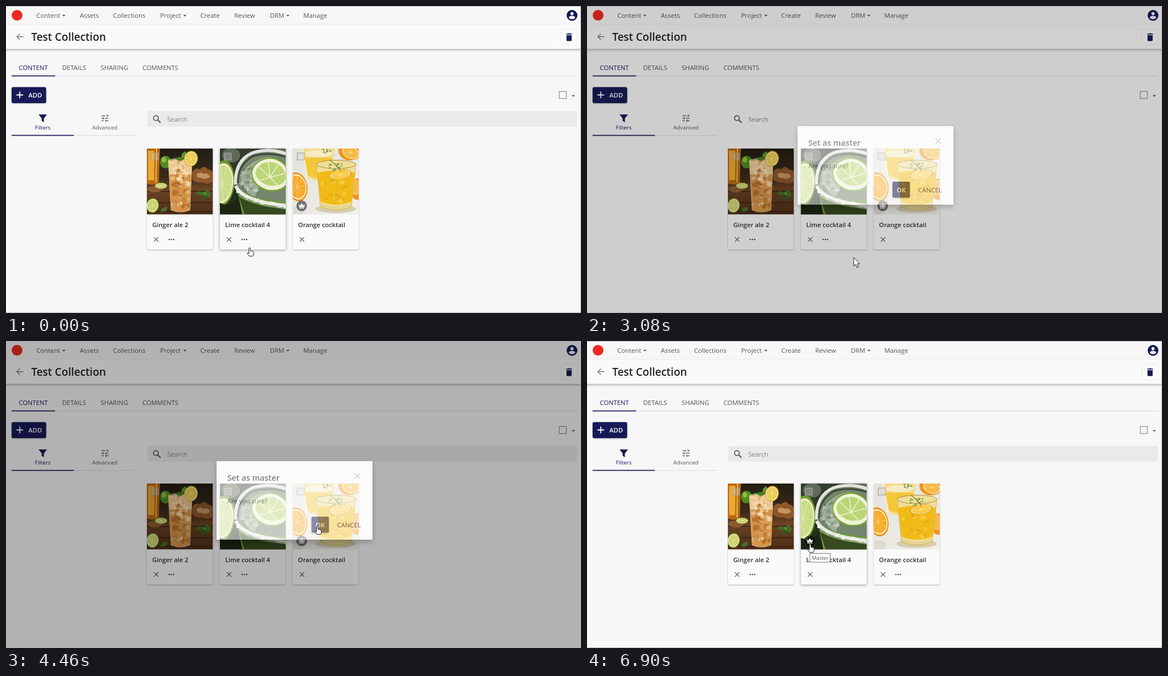
These frames come from a looping animation (1024 by 547 pixels, 8 s). An HTML page:

```html
<!DOCTYPE html>
<html lang="en">
<head>
<meta charset="utf-8">
<title>Set as master</title>
<style>
html, body { margin: 0; width: 100%; height: 100%; overflow: hidden; background: #f7f7f7; }
svg { display: block; width: 100vw; height: 100vh; }
text { font: 11.4px "Open Sans", "Noto Sans", sans-serif; fill: #555; white-space: pre; }
text.small { font-size: 9.85px; }
text.medium { font-weight: 600; font-size: 11.2px; fill: #303030; }
text.title { font-size: 19px; fill: #222; }
text.heading { font-size: 14.3px; }
text.bold { font-weight: 600; fill: #fff; }
text.navy { font-weight: 500; fill: #171a56; }
.line { fill: none; stroke: #666; stroke-width: 1.2; }
.card .paper { filter: drop-shadow(0 1px 1.2px rgba(0,0,0,.28)); }
.card.hover .paper { filter: drop-shadow(0 1.5px 2px rgba(0,0,0,.4)); }
.raised { filter: drop-shadow(0 1px 1.2px rgba(0,0,0,.35)); }
.menu { filter: drop-shadow(0 3px 5px rgba(0,0,0,.28)); }
.dialog { filter: drop-shadow(0 4px 5px rgba(0,0,0,.4)); }
</style>
</head>
<body>
<svg id="stage" viewBox="0 0 1024 547" preserveAspectRatio="none"></svg>
<script>
const LOOP = 8000;
const stage = document.getElementById('stage');

const text = (x, y, value, cls = '', extra = '') =>
  `<text x="${x}" y="${y}" class="${cls}" ${extra}>${value}</text>`;
const rect = (x, y, w, h, fill, extra = '') =>
  `<rect x="${x}" y="${y}" width="${w}" height="${h}" fill="${fill}" ${extra}/>`;
const path = (d, fill, extra = '') => `<path d="${d}" fill="${fill}" ${extra}/>`;
const oval = (x, y, rx, ry, fill, extra = '') =>
  `<ellipse cx="${x}" cy="${y}" rx="${rx}" ry="${ry}" fill="${fill}" ${extra}/>`;
const stroke = (d, color, width, extra = '') =>
  path(d, 'none', `stroke="${color}" stroke-width="${width}" ${extra}`);
const group = (x, y, body, extra = '') =>
  `<g transform="translate(${x} ${y})" ${extra}>${body}</g>`;
const caret = (x, y) => path(`M${x - 3} ${y - 1.3}h6l-3 3z`, '#555');
const crown = (fill, scale) =>
  path('M-4.8 2L-6-2.6-2.8-.6 0-5 2.8-.6 6-2.6 4.8 2zM-4.8 3h9.6v1.8h-9.6z', fill, `transform="scale(${scale})"`);
const dots = fill => [-4, 0, 4].map(x => oval(x, 0, 1.3, 1.3, fill)).join('');

// Repeatable scatter of small shapes
function scatter(count, seed, draw) {
  const random = () => (seed = (seed * 16807) % 2147483647) / 2147483647;
  return Array.from({ length: count }, () => draw(random)).join('');
}

// Tilted translucent facets that read as ice
const ice = (count, seed, [x, y, w, h], light, dark) => scatter(count, seed, r => {
  const px = x + r() * w, py = y + r() * h;
  return rect(px, py, 3 + r() * 7, 2 + r() * 7, r() > .45 ? light : dark,
    `opacity="${.3 + r() * .4}" transform="rotate(${r() * 70 - 35} ${px} ${py})"`);
});

// Citrus slice: rind, pith, flesh and segment lines
function citrus(x, y, rx, ry, rind, flesh, angle = 0) {
  const spokes = Array.from({ length: 5 }, (_, i) => {
    const a = i * Math.PI / 5, dx = Math.cos(a) * rx * .8, dy = Math.sin(a) * ry * .8;
    return `M${-dx} ${-dy}L${dx} ${dy}`;
  }).join('');
  return `<g transform="translate(${x} ${y}) rotate(${angle})">` +
    oval(0, 0, rx, ry, rind) + oval(0, 0, rx * .9, ry * .88, '#f1edc0') +
    oval(0, 0, rx * .8, ry * .78, flesh) + stroke(spokes, '#f4efbd', Math.max(.7, rx * .04), 'opacity=".6"') + '</g>';
}

const leaf = (x, y, angle, color = '#3f6d24') =>
  path('M0 0Q4-8 14-4 12 5 0 0', color, `transform="translate(${x} ${y}) rotate(${angle})"`);

const gingerPhoto =
  rect(0, 0, 117, 117, 'url(#wood)') +
  stroke('M0 76H117M0 96H117M0 112H117', '#2c1a0e', 1.6, 'opacity=".7"') +
  path('M0 0H23L21 62Q10 66 0 62z', '#b8690f') + path('M2 4H13V56H2z', '#eda832') +
  stroke('M17 0L16 60', '#f6cf74', 1.5) +
  oval(33, 24, 10, 11, '#4f8a1f') + oval(30, 20, 4, 5, '#93b944') + oval(51, 22, 8, 8, '#1f3814') +
  path('M80 42q6-10 14-5 8-9 14 0 9 0 9 10v12q-10 6-18 1-14 2-19-6z', '#8d5729') +
  path('M88 45q8-5 12 0 8-3 12 5-9 6-16 2-8 1-8-7z', '#c39462') +
  oval(14, 72, 13, 6, '#8a5c31') + citrus(25, 66, 11, 5.5, '#6f9b25', '#c5cc62') +
  leaf(86, 80, 10) + leaf(98, 78, 40, '#55892c') + leaf(95, 90, -15, '#315920') + leaf(104, 72, 70) +
  path('M38 22Q59 16 80 22L76 109Q59 116 43 109z', '#d5944a') +
  path('M38 22Q59 16 80 22L79 46H39z', '#ecc993') +
  ice(60, 71, [41, 24, 30, 78], '#fae3b8', '#a9621d') +
  stroke('M38 22L43 109Q59 116 76 109L80 22', '#f0d3a0', 1, 'opacity=".8"') +
  oval(59, 22, 21, 4, 'none', 'stroke="#f7e6c0"') +
  leaf(62, 18, -50, '#5c9630') + leaf(66, 18, 190, '#4a8127') +
  citrus(78, 18, 12, 14, '#d9a71e', '#eac84a', 15) +
  citrus(10, 101, 11, 13, '#7aa32b', '#c7d26a', 10) +
  leaf(24, 112, -20, '#46702a');

const limePhoto =
  rect(0, 0, 117, 117, 'url(#limeBack)') +
  oval(20, 12, 16, 13, '#5f6a58') + oval(105, 3, 22, 7, '#646b5e') +
  citrus(4, 62, 22, 41, '#6c9c2b', '#c9dc8a', 6) +
  path('M0 96Q20 106 30 88L44 117H0z', '#1c2613') +
  path('M29 38Q50-2 117 6V100Q74 100 42 84 26 66 29 38z', '#74866c') +
  path('M36 48Q58 16 90 15L62 86Q40 76 36 48z', '#9dac96') +
  ice(26, 43, [34, 32, 36, 44], '#d8e0d2', '#55694c') +
  stroke('M28 64Q26 22 57 8 86-2 117 9', '#e2e4df', 5.5) +
  stroke('M32 62Q31 30 58 14 86 5 117 15', '#3c4636', 3) +
  `<g transform="translate(90 47) rotate(14) scale(1.1)">` +
    path('M-32 2A32 30 0 0 1 32 2Q28 24 0 26-27 24-32 2z', '#77a52e') +
    path('M-30 2A30 28 0 0 1 30 2Q26 22 0 24-25 22-30 2z', '#f0f2d8') +
    path('M-25 2A25 23 0 0 1 25 2Q22 15 0 17-20 15-25 2z', '#bad576') +
    stroke('M0 4L-21-8M0 4L-9-20M0 4L8-20M0 4L21-8M0 4L-16 13M0 4L15 13', '#eef3d0', 1.4) + '</g>' +
  path('M30 68Q55 92 117 94V117H40z', '#6f9a40') +
  path('M34 86Q70 106 117 106V117H44z', '#36491f') +
  stroke('M28 66Q40 94 117 101', '#e6e8e2', 6) +
  stroke('M31 78Q54 99 117 107', '#8b9b7d', 2) +
  scatter(55, 19, r => {
    const a = r();
    return oval(30 + a * 87, 71 + 28 * Math.sqrt(a) + r() * 7, .7 + r(), .6 + r() * .6, '#fafaf7');
  });

const orangePhoto =
  rect(0, 0, 117, 117, 'url(#cloth)') +
  oval(101, 4, 20, 17, '#ee951c') + citrus(103, 7, 17, 12, '#f29b20', '#f7b43b', 20) +
  path('M17 0H74L68 50Q48 61 26 52z', '#f3dc8c') + path('M21 16H70L66 50Q46 56 27 48z', '#f3c738') +
  oval(46, 9, 24, 6, '#f5ecc4') + stroke('M17 0L26 52', '#fff6d8', 1.5) +
  citrus(8, 68, 18, 26, '#ed8f16', '#f7a928', -12) +
  oval(115, 72, 14, 19, '#ec9420') + oval(112, 69, 9, 14, '#f8b84b') +
  oval(76, 107, 36, 7, '#cdbb92', 'opacity=".65"') +
  path('M42 27Q77 15 112 27L104 103Q77 116 49 103z', '#f0de98') +
  path('M43 43Q77 35 111 43L104 94Q77 105 49 94z', '#f1bb17') +
  ice(20, 57, [49, 52, 46, 38], '#f9d95c', '#dca00c') +
  citrus(84, 46, 20, 9, '#ec9a12', '#fac536', -8) +
  path('M49 97Q77 108 104 96L102 105Q77 115 50 104z', '#e6d494') +
  oval(77, 28, 35, 7.5, 'none', 'stroke="#b39a51" stroke-width="1.2"') +
  stroke('M42 27L49 103Q77 115 104 103L112 27', '#d2b65d', 1) +
  stroke('M66 21Q77 28 85 40', '#587029', 1) +
  scatter(18, 33, r => oval(65 + r() * 23, 25 + r() * 16, 1.4, 1.1, '#668a35')) +
  scatter(12, 8, r => oval(54 + r() * 18, 1 + r() * 9, 1.4, 1, '#76904a')) +
  path('M0 104q12-8 24 4l-8 9H0z', '#dedbd3');

function card(id, x, label, photo) {
  return group(x, 254,
    rect(0, 0, 117.5, 180, '#fafafa', 'rx="2" class="paper"') +
    rect(0, 0, 117.5, 117.5, '#f4f4f4') +
    `<svg id="${id}Photo" width="117.5" height="117.5" viewBox="0 0 117 117">${photo}</svg>` +
    rect(8, 8, 12.4, 12.4, 'rgba(205,205,205,.3)', 'stroke="#a4a4a2" stroke-width="1.2"') +
    group(16, 102, oval(0, 0, 9.5, 9.5, 'rgba(0,0,0,.5)') + crown('#fff', .95), `id="${id}Crown"`) +
    text(9.5, 140, label, 'medium') +
    `<path class="line" d="M12.5 158l8 8m0-8l-8 8"/>` +
    rect(30.3, 148, 27, 28.5, '#dcdce6', `rx="2" id="${id}Button"`) +
    group(43.7, 162, dots('#4d4d55'), `id="${id}Dots"`),
    `id="${id}" class="card"`);
}

const defs = `<defs>
  <linearGradient id="wood" x2="0" y2="1"><stop stop-color="#211d13"/><stop offset=".45" stop-color="#3d2a1a"/>
    <stop offset=".6" stop-color="#6b4324"/><stop offset="1" stop-color="#4c2e19"/></linearGradient>
  <linearGradient id="limeBack" x2="0" y2="1"><stop stop-color="#363c33"/><stop offset="1" stop-color="#1f2a17"/></linearGradient>
  <linearGradient id="cloth" x2="1" y2="1"><stop stop-color="#e2e1dc"/><stop offset="1" stop-color="#f1efe9"/></linearGradient>
  <linearGradient id="under" x2="0" y2="1"><stop stop-color="#000" stop-opacity=".16"/><stop offset="1" stop-color="#000" stop-opacity="0"/></linearGradient>
</defs>`;

const nav = [[54, 'Content'], [131.5, 'Assets'], [190.5, 'Collections'], [274.5, 'Project'],
  [346, 'Create'], [406.5, 'Review'], [470, 'DRM'], [529.5, 'Manage']];
const tabs = [[100, 'DETAILS'], [168.5, 'SHARING'], [243, 'COMMENTS']];

const header =
  rect(0, 33, 1024, 43.5, '#fafafa') + rect(0, 32, 1024, 1, '#ececec') +
  rect(0, 76.5, 1024, 1.2, '#bdbdbd') + rect(0, 77.5, 1024, 4.5, 'url(#under)') +
  oval(19.7, 16.5, 9.6, 9.6, '#ee2a22') +
  nav.map(([x, label]) => text(x, 21, label)).join('') +
  [103, 318.5, 502].map(x => caret(x, 17)).join('') +
  oval(1008, 16.7, 9.6, 9.6, '#171a56') + oval(1008, 13.6, 2.8, 2.8, '#f4f4f8') +
  path('M1002.4 21.2q0-3.6 5.6-3.6t5.6 3.6q-2.2 2.4-5.6 2.4t-5.6-2.4z', '#f4f4f8') +
  `<path class="line" d="M31 54.7H19.5m5.3-5.5l-5.5 5.5 5.5 5.5"/>` +
  text(45, 62, 'Test Collection', 'medium title') +
  rect(988.5, 41.5, 28.5, 27.5, '#fbfbfb', 'rx="2" stroke="#ececec"') +
  path('M997.5 49.3h3l.8-.9h3l.8.9h3v1.5h-10.6zM998.2 52h9.2v9q0 1.4-1.4 1.4h-6.4q-1.4 0-1.4-1.4z', '#171a56');

const toolbar =
  rect(10, 124.3, 1007, 1, '#d9d9d9') + rect(10, 123.7, 77.5, 1.7, '#171a56') +
  text(22.7, 114, 'CONTENT', 'navy') + tabs.map(([x, label]) => text(x, 114, label)).join('') +
  rect(10, 144.5, 61.5, 28.5, '#171a56', 'rx="3" class="raised"') + stroke('M18.5 158.5h12m-6-6v12', '#fff', 1.8) +
  text(39.8, 162.7, 'ADD', 'bold') +
  rect(985.3, 152.3, 12.6, 12.6, 'none', 'stroke="#8a8a8a" stroke-width="1.2"') + caret(1010.3, 160) +
  path('M58 193.2h15l-5.5 7v7l-4-2.7v-4.3z', '#171a56') +
  text(65.5, 220, 'Filters', 'small navy', 'text-anchor="middle"') +
  stroke('M170 195.5h7m3 0h2.5M170 200h3m3 0h6.5M170 204.5h4m3.5 0h5M180 193.4v4.2M173.5 198v4.2M177.5 202.4v4.2', '#666', 1.3) +
  text(176, 220, 'Advanced', 'small', 'text-anchor="middle"') +
  rect(121, 230.3, 111, 1, '#d9d9d9') + rect(10, 229.7, 111, 1.7, '#171a56') +
  rect(251.5, 187, 765.5, 28, '#eaeaea', 'id="field"') +
  oval(267, 199.7, 4.3, 4.3, 'none', 'stroke="#555" stroke-width="1.7"') +
  stroke('M270.3 203l5 5', '#555', 2) + text(287, 206, 'Search', '', 'style="fill:#808080"');

const menu = `<g id="menu" class="menu">` + rect(411, 431.5, 159.5, 42, '#fff', 'rx="2"') +
  group(431.5, 453.5, crown('#666', 1.4)) + text(462.5, 457, 'Set as master') + '</g>';

// The shade leaves the dialog's area clear
const shade = path('M0 0H1024V547H0zM375 214V354H652.5V214z', '#000', 'id="shade" fill-rule="evenodd"');

const dialog = `<g id="dialog">` + rect(375, 214, 277.5, 140, '#fff', 'rx="2" class="dialog"') +
  text(394, 249, 'Set as master', 'medium heading') +
  stroke('M620.5 235.5l10 10m0-10l-10 10', '#aaa', 1.1) + text(394, 289, 'Are you sure?') +
  rect(544, 313, 31, 28.5, '#171a56', 'rx="2.5" id="ok" class="raised"') +
  text(559.7, 331.5, 'OK', 'bold', 'text-anchor="middle"') + text(589.5, 331.5, 'CANCEL', 'navy') + '</g>';

const outline = 'stroke="#1c1c1c" stroke-width="1" stroke-linejoin="round"';
const pointers =
  `<g id="pointer">` +
  path('M-1.4 9V1.2a1.4 1.4 0 0 1 2.8 0V5.5q1.3-.6 2 .5 1.4-.5 2 .6 1.4-.2 1.6 1.2V11q0 2-1.3 3.6H-1.2Q-2.5 12.5-4 10.2q-.6-1.6.6-1.6.9.2 2 1.6z',
    '#fff', outline + ' id="hand"') +
  path('M0 0V15.5L3.6 12.2 6 18.2 8.7 17 6.3 11.3H10.8z', '#fff', outline + ' id="arrow"') + '</g>';

stage.innerHTML = defs + rect(0, 0, 1024, 547, '#f7f7f7') + header + toolbar +
  card('ginger', 251, 'Ginger ale 2', gingerPhoto) +
  card('lime', 380.8, 'Lime cocktail 4', limePhoto) +
  card('orange', 510.6, 'Orange cocktail', orangePhoto) + menu + shade + dialog +
  `<g id="tip">` + rect(397, 378.5, 36, 15.5, '#fff', 'stroke="#777"') +
  text(400.5, 389.5, 'Master', '', 'style="font-size:9px"') + '</g>' + pointers +
  stroke('M0 .5H1023.5V546.5H0', '#b5b5b5', 1);

// Each track: [time, value...], held until the next step
const tracks = {
  pointer: [
    [0, 434, 431, 'hand'], [150, 435, 435, 'arrow'], [300, 438, 443, 'arrow'], [460, 440, 448, 'arrow'],
    [890, 439, 445, 'arrow'], [1050, 434, 432, 'hand'], [1200, 427, 421, 'hand'], [1350, 423.5, 416, 'hand'],
    [2120, 445.5, 434, 'hand'], [2270, 463, 442, 'hand'], [2400, 472, 447, 'hand'], [2540, 475, 448, 'hand'],
    [2940, 475, 448, 'arrow'], [3790, 482, 436, 'arrow'], [3920, 505, 404, 'arrow'], [4050, 532, 362, 'arrow'],
    [4180, 550, 336, 'hand'], [4310, 554.5, 330, 'hand'], [4980, 552, 334, 'hand'], [5100, 545, 340, 'hand'],
    [5230, 534.5, 345, 'hand'], [5380, 512, 350, 'hand'], [5520, 480, 355, 'hand'], [5660, 448, 359, 'hand'],
    [5800, 426, 361, 'hand'], [5930, 416, 362, 'hand'], [6080, 411, 362, 'hand'], [6210, 405, 362, 'hand'],
    [6340, 400, 362, 'hand'], [6470, 397.5, 362, 'hand']],
  shade: [[0, 0], [2940, .05], [3080, .17], [3220, .36], [3360, .5], [4460, .28], [4580, .1], [4700, 0]],
  dialog: [[0, 0], [2940, .12], [3080, .5], [3220, .85], [3360, 1], [4460, .58], [4580, .2], [4700, 0]],
  limePhoto: [[0, 1], [4980, 0], [5380, .4], [5520, .8], [5660, 1]],
  tip: [[0, 0], [6750, .45], [6900, 1]],
  hover: [[0, 'lime'], [300, ''], [1050, 'lime'], [2540, ''], [4700, 'orange'], [5520, 'lime']]
};
const at = (name, t) => tracks[name].findLast(step => step[0] <= t).slice(1);
const el = Object.fromEntries([...stage.querySelectorAll('[id]')].map(node => [node.id, node]));
const show = (id, on) => { el[id].style.visibility = on ? 'visible' : 'hidden'; };

function render(t) {
  const [x, y, shape] = at('pointer', t);
  el.pointer.setAttribute('transform', `translate(${x} ${y})`);
  show('hand', shape === 'hand');
  show('arrow', shape === 'arrow');
  for (const id of ['shade', 'dialog', 'limePhoto', 'tip']) el[id].style.opacity = at(id, t)[0];

  const [hovered] = at('hover', t);
  for (const id of ['ginger', 'lime', 'orange']) el[id].classList.toggle('hover', id === hovered);

  const menuOpen = t >= 1620 && t < 2940;
  show('menu', menuOpen);
  show('limeButton', menuOpen);
  show('gingerButton', false);
  show('orangeButton', false);

  const promoted = t >= 4980;
  show('gingerCrown', false);
  show('limeCrown', promoted);
  show('limeDots', !promoted);
  show('orangeCrown', !promoted);
  show('orangeDots', promoted);
  show('field', t < 2940 || t >= 4460);
  el.ok.setAttribute('fill', t >= 4180 && t < 4700 ? '#4b4e82' : '#171a56');
}

const start = performance.now();
function tick() {
  render((performance.now() - start) % LOOP);
  requestAnimationFrame(tick);
}
tick();
</script>
</body>
</html>
```
